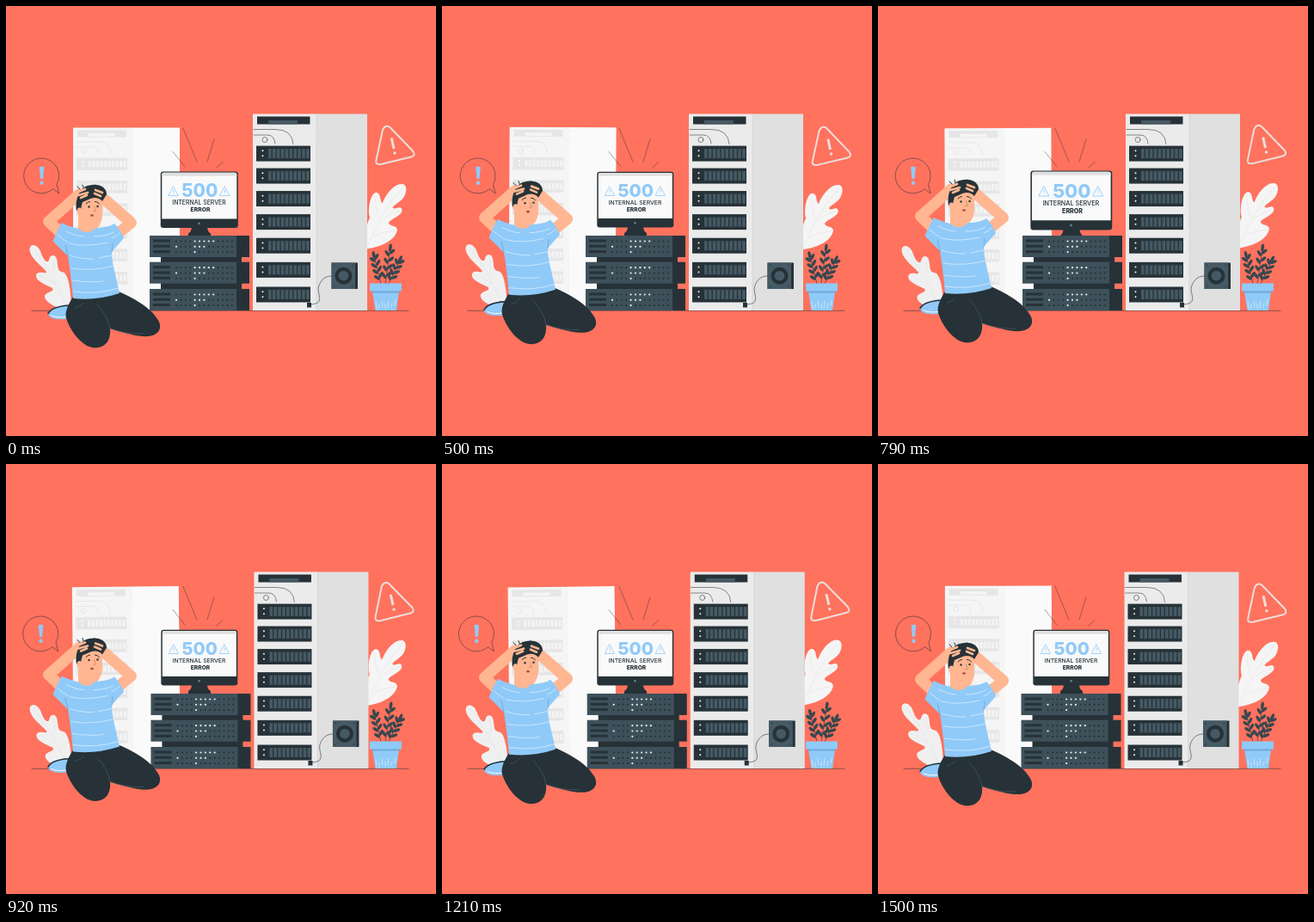
Write an HTML page that moves like this. It is 500 px wide and 500 px high and loops after 1.54 s.

```html
<!DOCTYPE html>
<html lang="en">
<head>
<meta charset="utf-8">
<title>Internal server error</title>
<style>
  html, body { margin: 0; height: 100%; overflow: hidden; background: #ff725e; }
  svg { display: block; width: 100vw; height: 100vh; }
  text { font-family: Inter, sans-serif; text-anchor: middle; }
  .line { fill: none; stroke: #263238; stroke-width: .55; stroke-linecap: round; }
  .round { fill: none; stroke-linecap: round; stroke-linejoin: round; }
</style>
</head>
<body>
<svg viewBox="0 0 500 500">
  <clipPath id="aboveFloor"><rect width="500" height="354"/></clipPath>

  <g clip-path="url(#aboveFloor)">
    <g id="backdrop">
      <path fill="#f0f0f0" d="M74 358C60 350 46 346 45 338C45 332 57 333 54 328C46 324 34 320 35 313C37 306 47 313 47 309C42 302 27 293 27.500 282C29 275 37 278 40 285C43 294 46 298 49 297C51 295 50 290 55 290C61 291 59 301 61 306C63 311 67 307 70 313C74 320 76 338 76 358Z"/>
      <path class="line" style="stroke:#e0e0e0" d="M33 283Q54 310 70 347M37 313Q50 317 58 324M56 295V312"/>

      <path fill="#f5f5f5" d="M78 141.500h70v224H78z"/>
      <path fill="#fafafa" d="M147.500 141.500H202v224h-54.500z"/>
      <path fill="#e6e6e6" d="M83 144.500h57v8H83z"/>
      <path fill="#f5f5f5" d="M96 148h31v3.500H96z"/>
      <path class="line" style="stroke:#dcdcdc" d="M82 158h26q14 0 14 14M82 164h19q7 0 7 8"/>
      <circle class="line" style="stroke:#dcdcdc" cx="91" cy="169" r="2.800"/>
      <g id="leftRacks"></g>

      <path fill="#f5f5f5" d="M414 283C416 268 420 252 423 246C420 236 424 218 430 217C437 217 434 228 438 229C441 220 451 206 461 207C468 208 466 222 458 227C453 231 449 233 450 235C454 237 459 231 460.500 237C461 244 446 248 445 252C446 257 454 254 455 260C453 272 437 281 414 283Z"/>
      <path class="line" style="stroke:#e2e2e2" d="M461 211Q436 240 421 278M429 221Q430 240 434 248M458 238Q442 242 436 250M452 261Q436 263 427 268"/>

      <g fill="none" stroke="#ecdedb">
        <path stroke-width="2" d="M438 144Q441 137.500 446.500 141L473 168.500Q477 174 471 175.500L436 184Q429 185 430.500 179Z"/>
        <path stroke-width="3" d="M448.300 153.500L451 166"/>
        <path class="round" stroke-width="3.400" d="M452 171h0"/>
      </g>
    </g>
  </g>

  <path class="line" d="M30 354.300H468"/>
  <path class="line" opacity=".8" d="M194 169.500L208 187M206 142.500L222 181M242 155L234 181M252 181.500L245 188"/>

  <g id="monitor">
    <path fill="#263238" d="M216 256h18q0 6 4 8v4h-26v-4q4-2 4-8z"/>
    <rect x="180.300" y="192.700" width="89" height="64.800" rx="3" fill="#263238"/>
    <path fill="#fafafa" d="M181.800 196q0-2 2-2h82q2 0 2 2v51h-86z"/>
    <path fill="#e0e0e0" d="M181.800 197.800V196q0-2 2-2h82q2 0 2 2v1.800z"/>
    <circle cx="224.500" cy="252.300" r="1.400" fill="#607d8b"/>
    <text x="225.300" y="222.200" font-size="20.600" font-weight="800" fill="#90caf9">500</text>
    <text x="224.500" y="231" font-size="6.800" font-weight="500" fill="#263238">INTERNAL SERVER</text>
    <text x="226" y="239" font-size="6.700" font-weight="800" fill="#263238">ERROR</text>
    <g id="alerts"></g>
  </g>

  <g id="equipment">
    <path fill="#263238" d="M180 290h94v42h-94z"/>
    <g id="servers"></g>
    <path fill="#ebebeb" d="M287 125.500h74.500V354H287z"/>
    <path fill="#e0e0e0" d="M361 125.500h59V354h-59z"/>
    <path stroke="#cfcfcf" stroke-width=".6" d="M361 125.500V354"/>
    <path fill="#263238" d="M292 128.500h61.500v9H292z"/>
    <path fill="#455a64" d="M305 133h34v4.500h-34z"/>
    <path class="line" d="M288 143.500h25q20 0 21 17M288 150h16q8 0 9 10"/>
    <circle class="line" cx="301" cy="155.500" r="3"/>
    <g id="rightRacks"></g>
    <path class="line" stroke-dasharray="2 .5" d="M354 347C373 346 360 334 364 325Q368 314 379 314"/>
    <path fill="#263238" d="M350 345h5v5.500h-5zM378.500 298.500H409V329h-30.500z"/>
    <path fill="#455a64" d="M378.500 298.500H406V329h-27.500z"/>
    <circle cx="392.500" cy="313.700" r="10" fill="#263238"/>
    <circle cx="392.500" cy="313.700" r="5.800" fill="#455a64"/>
    <path class="round" stroke="#263238" stroke-width="1.500" d="M381.500 301.500h0M403 301.500h0M381.500 326h0M403 326h0"/>
  </g>

  <g id="shrub"></g>
  <path fill="#90caf9" d="M425.500 329h32L454 354h-24.500z"/>
  <path fill="#6fa9da" d="M425.500 331h32l-.4 2.500h-31.200z"/>
  <path fill="#90caf9" d="M423 322.500h37v9h-37z"/>
  <path class="round" stroke="#e3f2fd" stroke-width=".7" d="M430 344l1 8M434 347v5M437 343l1 7M441 346v6M445 343l-1 8M449 346l-1 5M453 342l-1 6"/>

  <g id="bubble">
    <path class="line" d="M54.500 213A20.500 20.500 0 1 1 59 207.500L61.500 217.500Z"/>
    <path fill="#90caf9" d="M38.700 187.300q2.800-1.200 5.600 0L43 201h-3z"/>
    <circle cx="41.500" cy="205.800" r="2.200" fill="#90caf9"/>
  </g>

  <g id="person">
    <path fill="#90caf9" d="M49 358C52 350 64 347 82 347L78 362C66 366 50 365 49 358Z"/>
    <path class="round" stroke="#263238" stroke-width="1.600" d="M49 357.500C53 350.500 64 348 80 348"/>
    <path class="round" stroke="#fafafa" stroke-width="1" d="M53 360Q61 363.500 72 361"/>
    <path fill="#263238" d="M78 338C73 346 68 355 70 363C74 376 88 397.500 104 397.500C118 397 122 386 121 375C140 381 155 385 166 384C180 382 182 372 176 364C168 350 145 338 131 332Z"/>
    <path class="line" style="stroke:#53646d" d="M121 375Q119 361 106 347M121 375Q140 382 160 381M90 345Q87 350 80 351"/>

    <path class="round" stroke="#ffb691" stroke-width="13" d="M68 268L49.500 250.500L85 219M126 268L145.500 252L108 219"/>
    <path fill="#ffb691" d="M84 240L104 248V259Q96 270 84 260Z"/>
    <path fill="#f2997b" d="M86 251Q94 260 104 258V254Z"/>
    <path fill="#ffb691" d="M84 225C82 246 88 258 97 261C108 262 113 250 112 238V218H88Z"/>
    <path fill="#263238" d="M82 238C80 226 85 210 97 208.500C108 206 117 211 117 219L112 227C108 222 101 222 96 225L89 228Q87 233 87.500 238Z"/>
    <ellipse cx="85.500" cy="238.500" rx="3" ry="4" fill="#ffb691"/>
    <path class="round" stroke="#ffb691" stroke-width="2.700" d="M82 217L92 213M84 220L95 217M87 223L94 220M112 217L104 214M110 221L103 218"/>
    <path class="round" stroke="#263238" stroke-width="1" d="M93 230q2-2.500 4.500-2.500M103.500 227.500q3 0 5 2.500M86 213l-3-3M90 211l-1-3M101 210l2-2"/>
    <circle cx="96.500" cy="233.500" r="1.200" fill="#263238"/>
    <circle cx="106.500" cy="233" r="1.200" fill="#263238"/>
    <path class="line" style="stroke:#c96b55" d="M102.500 233l2 5.500h-3"/>
    <ellipse cx="100" cy="243.500" rx="1.900" ry="1.300" fill="#a8503f"/>

    <path fill="#90caf9" d="M84 259C76 257 68 254 65 252C60 260 56 270 54.500 273.500L72 291C75 310 77 328 78 340Q105 343 132 334C129 318 123 300 123 286L137 270C134 262 129 256 126 253C118 258 108 258 104 258Q95 268 84 259Z"/>
    <path class="round" stroke="#e3f2fd" stroke-width=".7" d="M60 266q7 6 12 9M74 276q18 5 44-1M132 264q-5 5-9 6M74 290q16 5 28 4M108 293l15-3M76 305q25 4 49-3M77 319q22 3 36 1M78 332q28 4 53-4M70 262q12 6 20 6M102 268q14 0 23-5"/>
    <path class="line" style="stroke:#5e91bf" d="M72 291L69 278M123 286L124 276"/>
  </g>
</svg>

<script>
const LOOP = 1540;
const el = id => document.getElementById(id);
const repeat = (n, draw) => Array.from({ length: n }, (_, i) => draw(i)).join('');
const rect = (x, y, w, h, fill) =>
  `<rect x="${x}" y="${y}" width="${w}" height="${h}" fill="${fill}"/>`;
const dot = (x, y, r, fill) => `<circle cx="${x}" cy="${y}" r="${r}" fill="${fill}"/>`;

// One drive bay: case, two lamps and a row of slots
const rack = (x, y, w, h, body, slot, lamp) =>
  rect(x, y, w, h, body) +
  dot(x + 7.5, y + h * .32, 1, lamp) + dot(x + 7.5, y + h * .65, 1, lamp) +
  repeat(10, i => rect(x + 14 + i * (w - 14) / 10, y + 3.5, (w - 14) / 10 - 1.3, h - 7, slot));

el('leftRacks').innerHTML = repeat(6, i =>
  rack(82, 176.5 + i * 26.5, 59, 14.5, '#e6e6e6', '#f3f3f3', '#fff'));
el('rightRacks').innerHTML = repeat(7, i =>
  rack(291, 162.6 + 25.7 * i + .27 * i * i, 63, 18, '#263238', '#455a64', '#f5f5f5'));

const server = y =>
  rect(167, y, 101.5, 25, '#3e515b') + rect(268, y, 15, 25, '#263238') +
  repeat(3, r =>
    rect(171, y + 4.5 + r * 6.3, 20, 3, '#263238') +
    repeat(13, i => {
      const lit = Math.abs(i - 6 + r) < 3 - r || i === 0 && r === 1;
      return dot(198 + i * 5.4, y + 6.5 + r * 6.3, 1.1, lit ? '#e6f1f5' : '#263238');
    }));
el('servers').innerHTML = [267, 297.7, 329].map(server).join('');

el('alerts').innerHTML = [195, 254].map(x =>
  `<g class="round" stroke="#90caf9" stroke-width=".8">
    <path d="M${x} 210l5.500 10.500h-11z"/><path d="M${x} 213.500v3M${x} 218.300h0"/></g>`).join('');

// A stem with paired leaves and one at the tip
const leaf = (y, tilt, length) =>
  `<ellipse cy="${-length / 2}" rx="1.800" ry="${length / 2}" fill="#37474f"
    transform="translate(0 ${y}) rotate(${tilt})"/>`;
const stem = (x, tilt, height) =>
  `<g transform="translate(${x} 323) rotate(${tilt})">
    <path class="line" d="M0 0V${-height}"/>
    ${repeat(4, i => leaf(-height * (.14 + i * .2), -42, 8) + leaf(-height * (.2 + i * .2), 42, 8))}
    ${leaf(-height + 6, 0, 9)}</g>`;
el('shrub').innerHTML = stem(436, -14, 36) + stem(441, 8, 44) + stem(445, 25, 33);

// Linear interpolation through [time, value] stops
function track(t, stops) {
  const i = Math.max(1, stops.findIndex(s => s[0] >= t));
  const [t0, v0] = stops[i - 1], [t1, v1] = stops[i];
  return v0 + (v1 - v0) * (t - t0) / (t1 - t0);
}
const swayStops = [[0, 0], [350, 1.3], [1100, -2], [1540, 0]];
const slideStops = [[0, 0], [500, 0], [1080, 2], [1330, 1.5], [1500, -.5], [1540, 0]];
const beatStops = [[0, 1], [.1, 1.09], [.3, 1], [.4, 1], [.5, 1.09], [.6, 1], [1, 1]];

const place = (id, transform) => el(id).setAttribute('transform', transform);

function render(now) {
  const t = now % LOOP;
  const sway = track(t, swayStops);
  const beat = track((t + 20) % LOOP / LOOP, beatStops);
  const lift = 3 * (1 - Math.cos(t / LOOP * 2 * Math.PI));
  place('backdrop', `rotate(${.44 * sway} 255 270)`);
  place('equipment', `translate(${track(t, slideStops)})`);
  place('monitor', `translate(225 212) scale(${beat}) translate(-225 -212)`);
  place('shrub', `rotate(${-.6 * sway} 441 323)`);
  place('bubble', `translate(${.8 * sway})`);
  place('person', `translate(0 ${-lift})`);
  requestAnimationFrame(render);
}
render(performance.now());
</script>
</body>
</html>
```
